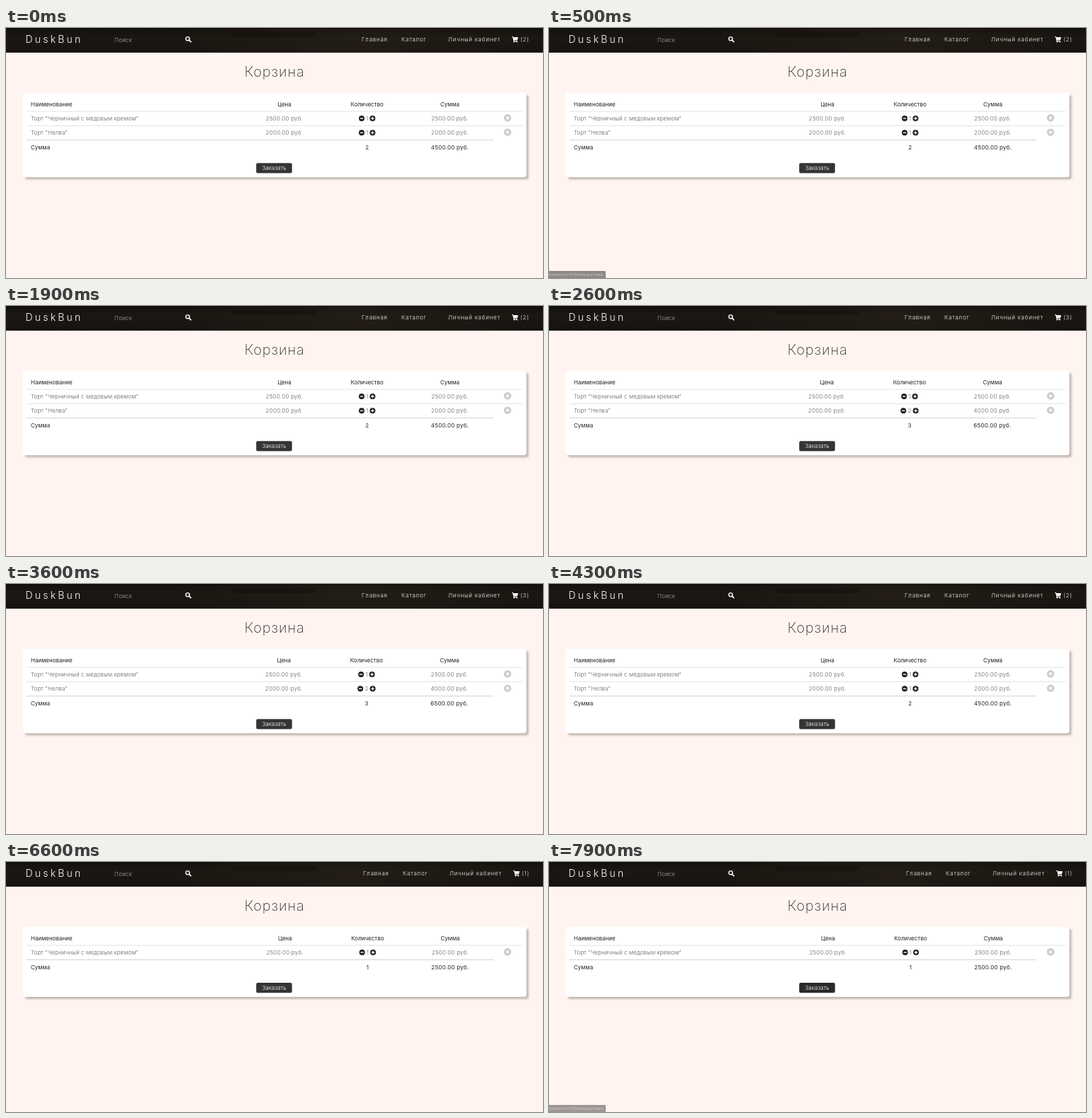
Write an HTML page that moves like this. It is 758 px wide and 354 px high and loops after 8000 ms.

```html
<!DOCTYPE html>
<html lang="ru">
<head>
<meta charset="utf-8">
<title>Корзина</title>
<style>
  html, body { margin: 0; width: 100%; height: 100%; overflow: hidden; background: #fff4ef; }
  svg { display: block; width: 758px; height: 354px; }
  text { font: 400 8px Inter, "Open Sans", sans-serif; fill: #222; }
  .mid { text-anchor: middle; }
  .num { letter-spacing: .25px; }
  .row { font-weight: 300; fill: #606060; }
  .name { letter-spacing: .1px; }
  .nav { fill: #f2f0ee; font-weight: 300; letter-spacing: .75px; }
  .brand { font-size: 14px; font-weight: 300; fill: #fff; letter-spacing: 3.2px; }
  .hint { fill: #aaa6a3; font-weight: 300; letter-spacing: .25px; }
  .title { font-size: 20px; font-weight: 200; fill: #333; letter-spacing: .9px; }
  .btn { fill: #fff; font-weight: 300; }
  .url { font-size: 5.2px; font-weight: 300; fill: #c4c4c4; text-anchor: end; }
  .card { filter: drop-shadow(3px 3px 1.5px rgba(80, 70, 65, .36)); }
</style>
</head>
<body>
<svg viewBox="0 0 758 354">
  <defs>
    <linearGradient id="wood" x2="0" y2="1">
      <stop offset="0" stop-color="#14100c"/>
      <stop offset=".4" stop-color="#1c1712"/>
      <stop offset="1" stop-color="#17130f"/>
    </linearGradient>
    <linearGradient id="glow">
      <stop offset="0" stop-color="#3a3027" stop-opacity="0"/>
      <stop offset=".5" stop-color="#3a3027" stop-opacity=".25"/>
      <stop offset="1" stop-color="#3a3027" stop-opacity="0"/>
    </linearGradient>
  </defs>
  <rect width="758" height="354" fill="#fff4ef"/>
  <rect width="758" height="34.9" fill="url(#wood)"/>
  <rect x="240" width="500" height="34.9" fill="url(#glow)"/>
  <rect x="320" y="6" width="118" height="7" rx="2" fill="#120e0b" opacity=".5"/>
  <rect width="758" height="1" fill="#0b0907"/>
  <text class="brand" x="27.5" y="21.4">DuskBun</text>
  <text class="hint" x="153" y="19.8">Поиск</text>
  <g fill="none" stroke="#fff">
    <circle cx="256.4" cy="15.2" r="2.6" stroke-width="1.4"/>
    <path d="M258.4 17.2l2.5 2.5" stroke-width="1.7" stroke-linecap="round"/>
  </g>
  <g id="nav">
    <text class="nav" x="502" y="19.4">Главная</text>
    <text class="nav" x="558" y="19.4">Каталог</text>
    <text class="nav" x="624" y="19.4">Личный кабинет</text>
    <g fill="#fff">
      <path d="M714 12h1.9l.3 1.1h6.7l-1 4.1h-4.7l.2.9h4.1v1h-5l-1.3-6H714z"/>
      <circle cx="717.3" cy="19.6" r=".95"/>
      <circle cx="721.2" cy="19.6" r=".95"/>
    </g>
    <text class="nav" id="count" x="726" y="19.4"></text>
  </g>
  <text class="title mid" x="379" y="68.6">Корзина</text>
  <g id="cart"></g>
  <g id="button">
    <rect id="face" x="353.2" y="191.2" width="50.5" height="14.4" rx="2"/>
    <text class="btn mid" x="378.5" y="201.4">Заказать</text>
  </g>
  <g id="status">
    <path d="M0 344h79a1 1 0 0 1 1 1v9H0z" fill="#1f1f1f"/>
    <text class="url" x="76.5" y="351">workbench:4170/shop/purchase</text>
  </g>
</svg>
<script>
const LOOP = 8000;
const $ = id => document.getElementById(id);

const items = [
  ['Торт "Черничный с медовым кремом"', 2500],
  ['Торт "Нелва"', 2000]
];

// Column centres and menu offset depend on the content widths.
const carts = {
  pair:  { qty: [1, 1], cols: [393, 509.7, 626.5], shift: 0 },
  extra: { qty: [1, 2], cols: [392.2, 508.9, 626], shift: 0 },
  one:   { qty: [1], cols: [393.7, 510.4, 627], shift: 2 }
};

// Each track is a list of [start ms, value].
const tracks = {
  cart: [[0, 'pair'], [2600, 'extra'], [4300, 'pair'], [6600, 'one']],
  close: [[0, '#cbcbcb'], [6000, '#a0a0a0'], [6400, '#8c8c8c'], [6600, '#cbcbcb']],
  face: [[0, '#343434'], [7500, '#2e2e2e'], [7600, '#292929']],
  status: [[0, 0], [500, .5], [600, 1], [1800, .5], [1900, 0], [7900, .44]]
};

const at = (track, t) => track.findLast(step => step[0] <= t)[1];
const text = (x, y, cls, s) => `<text x="${x}" y="${y}" class="${cls}">${s}</text>`;
const rule = (y, end, color) => `<path d="M29 ${y}H${end}" stroke="${color}"/>`;
const money = n => n.toFixed(2) + ' руб.';

function disc(x, y, r, color, mark, width) {
  return `<g transform="translate(${x} ${y})"><circle r="${r}" fill="${color}"/>` +
    `<path d="${mark}" stroke="#fff" stroke-width="${width}"/></g>`;
}

function drawCart({ qty, cols, shift }, closeColor) {
  const [price, amount, sum] = cols;
  const n = qty.length;
  const drop = n * 20.3;
  let total = 0, pieces = 0;
  let out = `<rect class="card" x="24" y="92" width="710.5" height="${78.6 + drop}" rx="3" fill="#fff"/>`;
  out += text(35, 110.8, '', 'Наименование') + text(price, 110.8, 'mid', 'Цена') +
    text(amount, 110.8, 'mid', 'Количество') + text(sum, 110.8, 'mid', 'Сумма');
  out += rule(118, 729, '#e2e2e2');

  qty.forEach((q, i) => {
    const [name, cost] = items[i];
    const y = 128 + i * 20.3, base = y + 3;
    const gap = q > 1 ? 8.7 : 7.7;
    const last = i === n - 1;
    total += cost * q;
    pieces += q;
    out += text(35, base, 'row name', name) +
      text(price, base, 'row num mid', money(cost)) +
      text(amount, base, 'row mid', q) +
      text(sum, base, 'row num mid', money(cost * q)) +
      disc(amount - gap, y, 4, '#1f1f1f', 'M-2.2 0h4.4', 1.3) +
      disc(amount + gap, y, 4, '#1f1f1f', 'M-2.2 0h4.4M0-2.2v4.4', 1.3) +
      disc(708, y - .7, 5.2, i ? closeColor : '#cbcbcb', 'M-1.8-1.8l3.6 3.6M1.8-1.8l-3.6 3.6', 1.5) +
      rule(y + 10.4, last ? 688 : 729, last ? '#d2d2d2' : '#e2e2e2');
  });

  const base = 131.3 + drop;
  out += text(35, base, '', 'Сумма') + text(amount, base, 'mid', pieces) +
    text(sum, base, 'num mid', money(total));
  $('cart').innerHTML = out;
  $('count').textContent = `(${pieces})`;
  $('nav').setAttribute('transform', `translate(${shift})`);
  $('button').setAttribute('transform', `translate(0 ${drop - 40.6})`);
}

let shown = '';
function frame() {
  const t = performance.now() % LOOP;
  const cart = at(tracks.cart, t), close = at(tracks.close, t);
  if (cart + close !== shown) {
    drawCart(carts[cart], close);
    shown = cart + close;
  }
  $('face').setAttribute('fill', at(tracks.face, t));
  $('status').setAttribute('opacity', at(tracks.status, t));
  requestAnimationFrame(frame);
}
frame();
</script>
</body>
</html>
```
